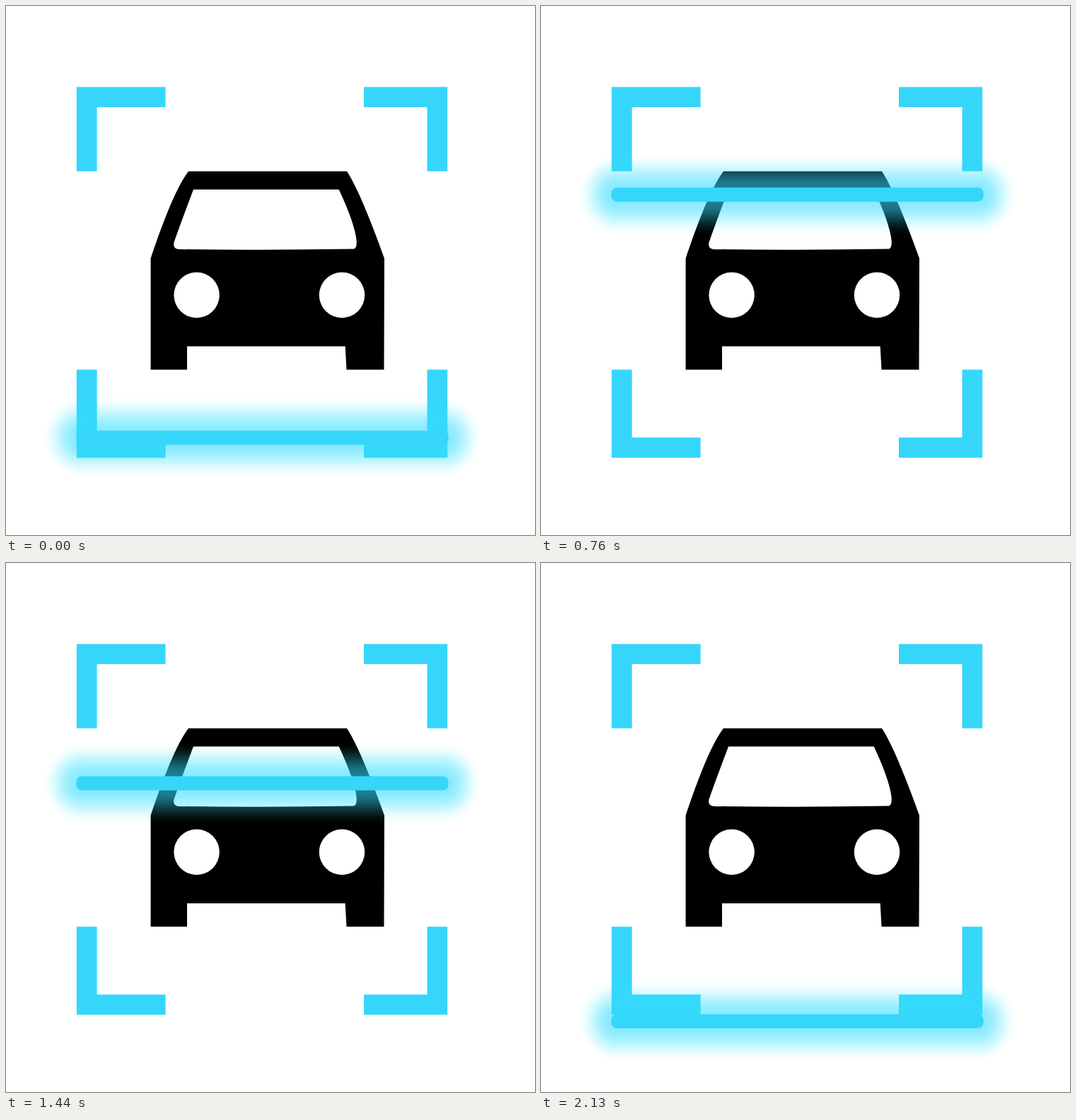
Animation, 748 px wide and 748 px high, one loop 2160 ms. Source, as an HTML page:

```html
<!DOCTYPE html>
<html>
<head>
<meta charset="utf-8">
<title>Car scan</title>
<style>
  html, body { margin: 0; width: 100%; height: 100%; overflow: hidden; background: #fff; }
  svg { display: block; width: 100vw; height: 100vh; }
</style>
</head>
<body>
<svg viewBox="0 0 748 748">
  <path d="M258 233.8H482C498 258 518 310 535 357L534.5 514.3H481.5L479.7 481.3H256V514.3H204.6V357C220 311 240 257 258 233.8Z"/>
  <g fill="#fff">
    <path d="M265 259.5H470.7C484 288 494 314 495.8 333Q496 343 491.5 343.6Q370 345.5 244 344Q236 343 237.4 335Q240 326 265 259.5Z"/>
    <circle cx="269.6" cy="408.8" r="32.2"/>
    <circle cx="475" cy="408.8" r="32.2"/>
  </g>
  <g fill="#36d6fb">
    <path d="M99.8 114.4H225.6V143H128.6V233.8H99.8ZM506 114.4H624.2V233.8H595.5V143H506ZM99.8 514.3H128.6V610.2H225.6V638.8H99.8ZM595.5 514.3H624.2V638.8H506V610.2H595.5Z"/>
    <g id="scan"></g>
  </g>
</svg>
<script>
const LOOP = 2160, STEP = 14.95, TURN = 32, TOP = 132.1, BOTTOM = 648;
// Time in ms and tick count; the pace is even between the entries.
const pace = [[0, 0], [30, 1], [250, 7], [580, 18], [950, 29], [1130, 35], [1440, 44], [2130, 67], [LOOP, 68]];
const scan = document.getElementById('scan');

function addBar(grow, alpha) {
  const bar = document.createElementNS('http://www.w3.org/2000/svg', 'rect');
  const attrs = { x: 99.4 - grow, y: -10 - grow, width: 526.2 + 2 * grow, height: 20 + 2 * grow, rx: 8 + grow, opacity: alpha };
  for (const name in attrs) bar.setAttribute(name, attrs[name]);
  scan.append(bar);
}

// Stack widening bars so that their combined opacity follows a soft falloff.
let covered = 0;
for (let grow = 48; grow > 0; grow -= 3) {
  const u = 1 - (grow - 1.5) / 49;
  const total = 0.57 * u * u * (3 - 2 * u);
  addBar(grow, 1 - (1 - total) / (1 - covered));
  covered = total;
}
addBar(0, 1);

function tickAt(time) {
  const i = pace.findIndex(([end]) => time < end);
  const [t0, n0] = pace[i - 1], [t1, n1] = pace[i];
  return Math.min(67, Math.floor(n0 + (n1 - n0) * (time - t0) / (t1 - t0) + 0.02));
}

function draw() {
  const tick = tickAt(performance.now() % LOOP);
  const y = Math.min(BOTTOM, TOP + STEP * Math.abs(tick - TURN));
  scan.setAttribute('transform', `translate(0 ${y})`);
  requestAnimationFrame(draw);
}
draw();
</script>
</body>
</html>
```
